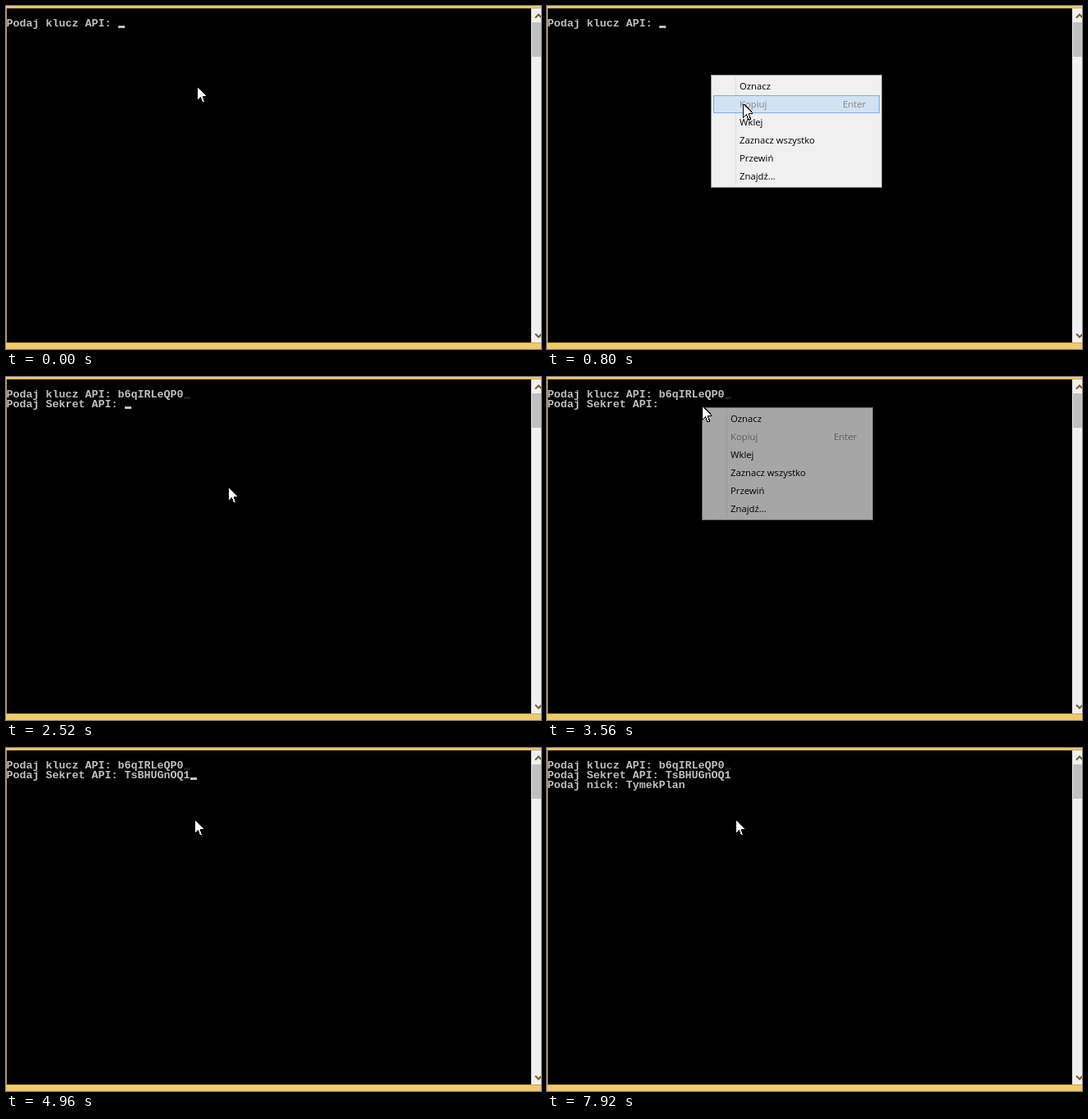
An HTML page for the animation above (8 s loop, 653 by 419 pixels).

```html
<!DOCTYPE html>
<html lang="pl">
<head>
<meta charset="utf-8">
<title>Konsola</title>
<style>
  html, body { margin: 0; width: 100%; height: 100%; overflow: hidden; background: #000; }
  svg { display: block; }
  .row { font: bold 13.33px "Liberation Mono", monospace; fill: #c0c0c0; white-space: pre; }
  #menu text { font: 11.3px "Open Sans", sans-serif; }
  #menu .off { fill: #838383; }
</style>
</head>
<body>
<svg width="653" height="419" viewBox="0 0 653 419">
  <rect width="653" height="419" fill="#f2c968"/>
  <rect y="2" width="653" height="410" fill="#d0a650"/>
  <rect x="1" y="3" width="640" height="408"/>
  <rect x="641" y="3" width="12" height="408" fill="#f0f0f0"/>
  <rect x="642" y="20" width="11" height="42" fill="#c0c0c0"/>
  <path d="M646 14.5L650 10.5 654 14.5M646 400.5L650 404.5 654 400.5" fill="none" stroke="#7a5c1e" stroke-width="2"/>
  <rect id="ghost" y="24" width="8" height="3" fill="#1b1b1b"/>
  <text class="row" x=".5" y="25"></text>
  <text class="row" x=".5" y="37"></text>
  <text class="row" x=".5" y="49"></text>
  <rect id="caret" width="8" height="3" fill="#c0c0c0"/>
  <g id="menu">
    <g id="back">
      <rect x=".5" y=".5" width="208" height="137" fill="#f0f0f0" stroke="#9b9b9b"/>
      <path d="M30.5 3V135" stroke="#dcdcdc"/>
    </g>
    <rect id="hover" x="3.5" width="202" height="21" fill="#d1e2f2" stroke="#78aee5"/>
    <g id="labels"></g>
  </g>
  <path id="mouse" d="M0 0H.7L10.2 9.6V10H5.5L8 17H6L3.5 10.7 0 14Z" fill="#fff" stroke="#000" stroke-width="2" paint-order="stroke" shape-rendering="crispEdges"/>
</svg>
<script>
const LOOP = 8000, STEP = 40, BLINK = 440, ITEM = 22, PASTE = 2;
const $ = id => document.getElementById(id);
const rows = document.querySelectorAll('.row');
const show = (el, on) => el.setAttribute('visibility', on ? 'inherit' : 'hidden');
const place = (el, x, y) => el.setAttribute('transform', `translate(${x} ${y})`);
const clamp = v => Math.max(0, Math.min(1, v));
const ease = p => p * p * (3 - 2 * p);

const items = ['Oznacz', 'Kopiuj', 'Wklej', 'Zaznacz wszystko', 'Przewiń', 'Znajdź...'];
$('labels').innerHTML = items.map((name, i) => {
  const hint = i === 1 ? '<text x="161">Enter</text>' : '';
  return `<g class="${hint && 'off'}" transform="translate(0 ${18 + ITEM * i})"><text x="35">${name}</text>${hint}</g>`;
}).join('');
const labels = [...$('labels').children];

const menus = [
  { x: 200, y: 84, open: 480, pick: 1120 },
  { x: 189, y: 37, open: 3456, pick: 4200 }
];
const moves = [
  { from: 40, to: 320, x: 201, y: 84 },
  { from: 640, to: 880, x: 254, y: 134 },
  { from: 1520, to: 1640, x: 272, y: 136 },
  { from: 2720, to: 3160, x: 190, y: 37 },
  { from: 3640, to: 4040, x: 231, y: 89 }
];
// moments at which the caret lights up
const lights = [-240, 640, 1640, 2520, 3840, 4960, 5440, 6320];
const nick = 'TymekPlan', typeStart = 6440, typeGap = 185;

function mouseAt(t) {
  let x = 234, y = 100;
  for (const m of moves) {
    const p = ease(clamp((t - m.from) / (m.to - m.from)));
    x += (m.x - x) * p;
    y += (m.y - y) * p;
  }
  return [Math.round(x), Math.round(y)];
}

function drawText(t) {
  const typed = Math.max(0, Math.floor((t - typeStart) / typeGap) + 1);
  const lines = [
    'Podaj klucz API: ' + (t >= menus[0].pick ? 'b6qIRLeQP0' : ''),
    t >= 1920 ? 'Podaj Sekret API: ' + (t >= menus[1].pick ? 'TsBHUGnOQ1' : '') : '',
    t >= 5440 ? 'Podaj nick: ' + nick.slice(0, typed) : ''
  ];
  lines.forEach((line, i) => rows[i].textContent = line);

  const last = lines.filter(Boolean).length - 1;
  place($('caret'), 1 + 8 * lines[last].length, 24 + 12 * last);
  show($('caret'), !typed && lights.some(l => t >= l && t < l + BLINK));
  place($('ghost'), 1 + 8 * lines[0].length, 0);
  show($('ghost'), last > 0 || t < menus[0].pick && t >= 200);
}

function drawMenu(t, mouseY) {
  const m = menus.find(m => t > m.open && t < m.pick + 240);
  show($('menu'), m);
  if (!m) return;
  const picked = t >= m.pick;
  const over = picked ? PASTE : Math.floor((mouseY - m.y - 3) / ITEM);
  place($('menu'), m.x, m.y);
  $('menu').setAttribute('opacity', clamp(picked ? 1 - (t - m.pick + STEP) / 280 : (t - m.open) / 150));
  show($('back'), !picked);
  show($('hover'), over >= 0);
  $('hover').setAttribute('y', 3.5 + ITEM * over);
  labels.forEach((el, i) => show(el, !picked || i === PASTE));
}

function frame(now) {
  const t = Math.floor(now % LOOP / STEP) * STEP;
  const [x, y] = mouseAt(t);
  drawText(t);
  drawMenu(t, y);
  place($('mouse'), x, y);
  requestAnimationFrame(frame);
}
frame(0);
</script>
</body>
</html>
```
